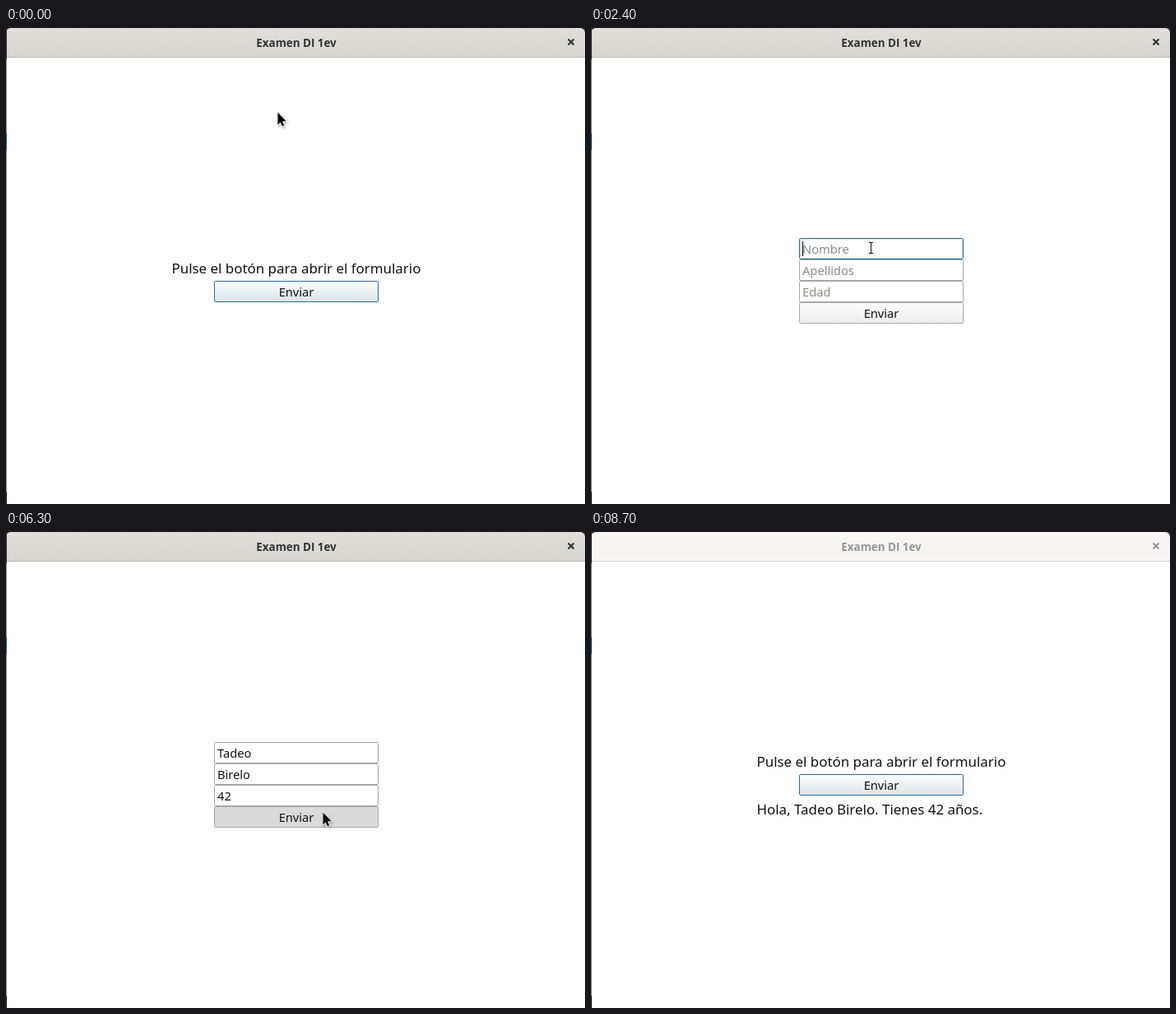
These frames come from a looping animation (704 by 578 pixels, 9 s). An HTML page with a canvas:

```html
<!DOCTYPE html>
<html lang="es">
<head>
<meta charset="utf-8">
<title>Examen DI 1ev</title>
<style>
  html, body { margin: 0; width: 100%; height: 100%; overflow: hidden; background: #fff; }
  canvas { display: block; }
</style>
</head>
<body>
<canvas id="stage" width="704" height="578"></canvas>
<script>
const ctx = document.getElementById('stage').getContext('2d');
const W = 704, H = 578, LOOP = 9000, STEP = 100;
const FONT = '"Noto Sans", "Open Sans", sans-serif';
const SMALL = `14.667px ${FONT}`, LARGE = `16.9px ${FONT}`;
const TITLE = 'bold 13.4px "Open Sans", "Noto Sans", sans-serif';
const INK = '#111', BLUE = '#2a6c9c', GREY = '#a6a6a6';

const FORM_X = 253, FORM_Y = 255, ROW = 26, FIELD_W = 200, LABEL_X = 201.5;
const OPEN = 1200, PRESS = 6300, SENT = 6500, GONE = 8400, BLUR = 8700;

// Each field: hint, value, focus time, first key, ms per key
const fields = [
  { hint: 'Nombre', value: 'Tadeo', focus: 2400, start: 3000, pace: 125 },
  { hint: 'Apellidos', value: 'Birelo', focus: 3600, start: 4000, pace: 120 },
  { hint: 'Edad', value: '42', focus: 4800, start: 5300, pace: 100 }
];
const [FIRST, LAST, AGE] = fields.map(f => f.value);

// Pointer moves: each one starts where the last one ended and bends towards a point
const home = { x: 330, y: 102 };
const moves = [
  { from: 100, until: 700, bend: { x: 322, y: 370 }, to: { x: 357, y: 322 } },
  { from: OPEN, until: 2100, bend: { x: 361, y: 214 }, to: { x: 341, y: 267 } },
  { from: 5500, until: 6100, bend: { x: 577, y: 190 }, to: { x: 385, y: 340 } },
  { from: 7700, until: 7800, bend: { x: 368, y: 341 }, to: { x: 351, y: 342 } },
  { from: 7800, until: GONE, bend: { x: 205, y: 151 }, to: { x: 60, y: -40 } }
];

const clamp = v => Math.min(1, Math.max(0, v));

function pointerAt(t) {
  let p = home;
  for (const m of moves) {
    const u = clamp((t - m.from) / (m.until - m.from)), v = 1 - u;
    const mix = k => v * v * p[k] + 2 * u * v * m.bend[k] + u * u * m.to[k];
    p = { x: mix('x'), y: mix('y') };
    if (u < 1) break;
  }
  return p;
}

// Distance still to slide, easing out
const slide = (t, start) => W * (1 - clamp((t - start) / 670)) ** 2;

const typed = (f, t) => f.value.slice(0, Math.max(0, Math.floor((t - f.start) / f.pace) + 1));

function text(str, x, y, font, color = INK, align = 'left') {
  ctx.font = font;
  ctx.fillStyle = color;
  ctx.textAlign = align;
  ctx.fillText(str, x, y);
}

function rect(x, y, w, h, color) {
  ctx.fillStyle = color;
  ctx.fillRect(x, y, w, h);
}

function box(x, y, fill, border) {
  ctx.beginPath();
  ctx.roundRect(x + 0.5, y + 0.5, FIELD_W - 1, ROW - 1, 1.2);
  ctx.fillStyle = fill;
  ctx.fill();
  ctx.lineWidth = 1;
  ctx.strokeStyle = border;
  ctx.stroke();
}

function vertical(y, h, top, bottom) {
  const g = ctx.createLinearGradient(0, y, 0, y + h);
  g.addColorStop(0, top);
  g.addColorStop(1, bottom);
  return g;
}

function button(x, y, state) {
  const fill = state === 'pressed' ? '#dadada'
    : state === 'focus' ? vertical(y, ROW, '#fdfeff', '#dbe3e9')
    : vertical(y, ROW, '#fefefe', '#ebebeb');
  box(x, y, fill, state === 'focus' ? BLUE : GREY);
  text('Enviar', x + FIELD_W / 2, y + 19, SMALL, INK, 'center');
}

function drawField(f, x, y, t, focused) {
  const value = typed(f, t);
  box(x, y, '#fff', focused ? BLUE : GREY);
  text(value || f.hint, x + 4, y + 19, SMALL, value ? INK : '#8a8a88');
  if (focused) {
    ctx.strokeStyle = '#d3e3ee';
    ctx.strokeRect(x + 1.5, y + 1.5, FIELD_W - 3, ROW - 3);
    const end = ctx.measureText(value).width;
    rect(Math.round(x + 4 + end), y + 4, 1, 18, '#000');
  }
}

function drawForm(t, dx) {
  const x = Math.round(FORM_X + dx);
  fields.forEach((f, i) => {
    const next = i + 1 < fields.length ? fields[i + 1].focus : PRESS;
    drawField(f, x, FORM_Y + i * ROW, t, t >= f.focus && t < next);
  });
  button(x, FORM_Y + fields.length * ROW, t < PRESS ? 'normal' : 'pressed');
}

function drawHome(dx, answered) {
  const x = Math.round(dx), up = answered ? ROW / 2 : 0;
  text('Pulse el botón para abrir el formulario', LABEL_X + x, 298 - up, LARGE);
  button(FORM_X + x, 307 - up, 'focus');
  if (answered) text(`Hola, ${FIRST} ${LAST}. Tienes ${AGE} años.`, LABEL_X + x, 343, LARGE);
}

function drawWindow(active) {
  rect(0, 0, W, H, '#fff');
  rect(0, 0, W, 8, '#333');
  ctx.beginPath();
  ctx.roundRect(0, 0, W, 36, [6, 6, 0, 0]);
  ctx.fillStyle = active ? vertical(0, 35, '#e1dedb', '#d9d5d1') : '#f6f5f4';
  ctx.fill();
  rect(0, 35, W, 1, active ? '#bfb8b1' : '#d5d0cc');

  const ink = active ? '#2e3436' : '#929595';
  text('Examen DI 1ev', 353, 23, TITLE, ink, 'center');
  ctx.strokeStyle = ink;
  ctx.lineWidth = 2.2;
  ctx.beginPath();
  for (const s of [-3.5, 3.5]) {
    ctx.moveTo(687 - s, 13.5);
    ctx.lineTo(687 + s, 20.5);
  }
  ctx.stroke();
}

// Sliver of the desktop left of the window
function drawEdge() {
  rect(0, 0, 1, H, '#909090');
  rect(0, 0, 1, 38, '#333');
  rect(0, 128, 1, 20, '#1d4c70');
  rect(0, 563, 1, 15, '#1c1c1c');
}

function drawArrow(x, y) {
  ctx.save();
  ctx.translate(x, y);
  ctx.beginPath();
  ctx.moveTo(0.4, 0.5);
  ctx.lineTo(0.4, 15.4);
  ctx.lineTo(3.6, 12.4);
  ctx.lineTo(6, 17.3);
  ctx.lineTo(8.2, 16.3);
  ctx.lineTo(6, 11.4);
  ctx.lineTo(10.6, 11);
  ctx.closePath();
  ctx.lineWidth = 1.4;
  ctx.strokeStyle = '#fff';
  ctx.shadowColor = 'rgba(0,0,0,0.35)';
  ctx.shadowBlur = 3;
  ctx.shadowOffsetX = 1;
  ctx.shadowOffsetY = 2;
  ctx.stroke();
  ctx.shadowColor = 'transparent';
  ctx.fillStyle = '#0a0a0a';
  ctx.fill();
  ctx.restore();
}

function drawBeam(x, y) {
  ctx.save();
  ctx.shadowColor = 'rgba(0,0,0,0.35)';
  ctx.shadowBlur = 2;
  ctx.shadowOffsetY = 1;
  rect(x - 2, y - 7, 3, 14, '#fff');
  ctx.restore();
  rect(x - 1, y - 7, 1, 13, INK);
  rect(x - 3, y - 7, 5, 1, INK);
  rect(x - 3, y + 6, 5, 1, INK);
}

function drawPointer(t, formX) {
  const p = pointerAt(t), x = Math.round(p.x), y = Math.round(p.y);
  const overField = x >= formX && x < formX + FIELD_W
    && y >= FORM_Y && y < FORM_Y + fields.length * ROW;
  (overField ? drawBeam : drawArrow)(x, y);
}

function draw(t) {
  let formX = W;
  drawWindow(t < BLUR);
  if (t < OPEN) {
    drawHome(0, false);
  } else if (t < SENT) {
    const dx = slide(t, 1010);
    if (dx > 0) drawHome(dx - W, false);
    drawForm(t, dx);
    formX = FORM_X + dx;
  } else {
    drawHome(-slide(t, 6130), true);
  }
  drawEdge();
  if (t < GONE) drawPointer(t, formX);
}

const start = performance.now();
function tick() {
  const t = (performance.now() - start) % LOOP;
  draw(Math.floor(t / STEP) * STEP);
  requestAnimationFrame(tick);
}
tick();
</script>
</body>
</html>
```
